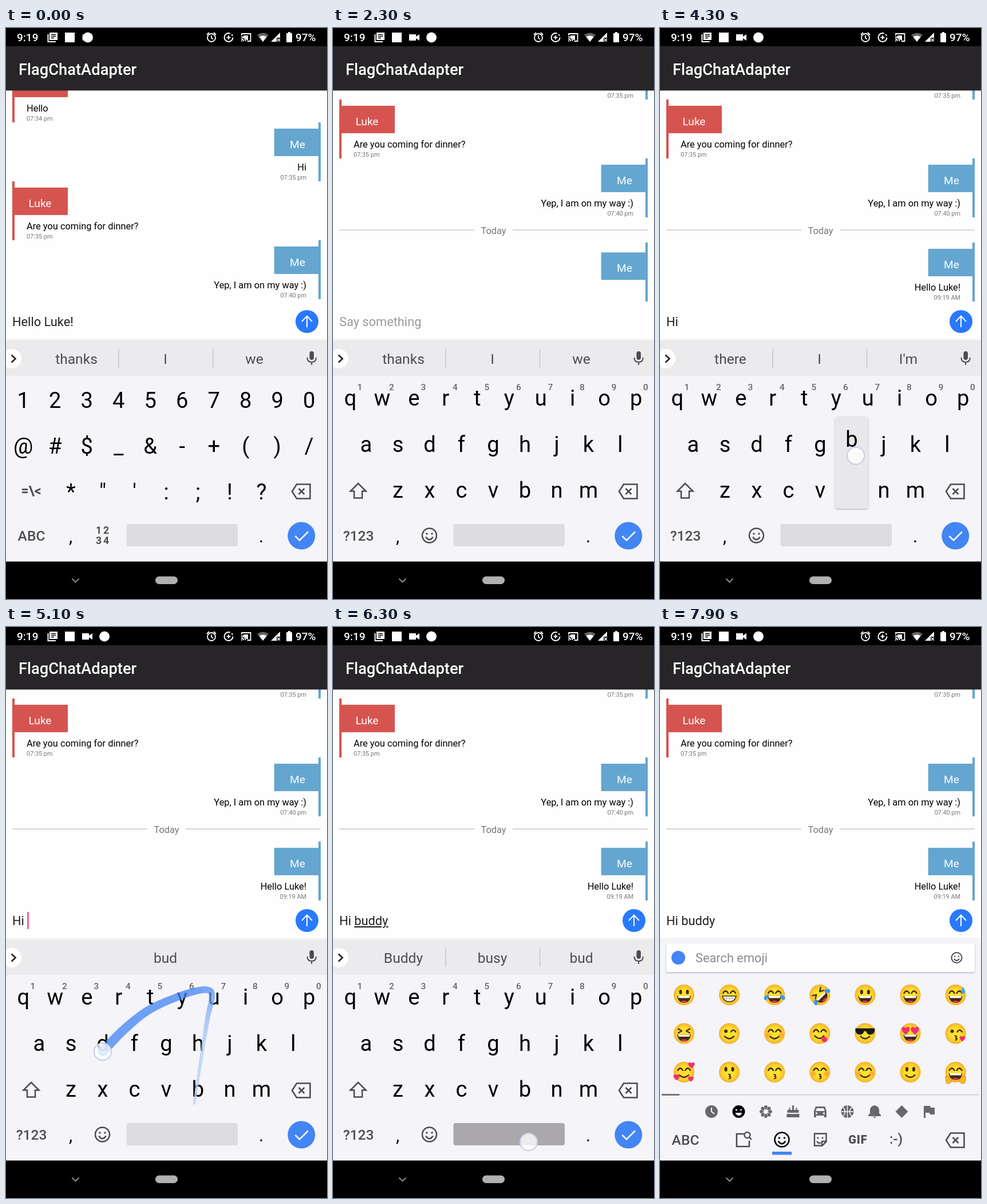
Write an HTML page that moves like this. It is 561 by 998 pixels and loops after 8 s.

```html
<!DOCTYPE html>
<html lang="en">
<head>
<meta charset="utf-8">
<title>FlagChatAdapter</title>
<style>
html, body { margin: 0; width: 100%; height: 100%; overflow: hidden; background: #000; }
svg { display: block; width: 561px; height: 998px; font-family: Roboto, "Open Sans", sans-serif; }
</style>
</head>
<body>
<svg id="stage" viewBox="0 0 561 998"></svg>
<script>
const LOOP = 8000;
const RED = '#d6544f', BLUE = '#64a6cf', KEY_BLUE = '#4285f4', GREY = '#4c4c50';

// ---------- markup helpers ----------
const attrs = o => Object.entries(o).map(([k, v]) => ` ${k}="${v}"`).join('');
const text = (x, y, s, size, o = {}) => `<text x="${x}" y="${y}" font-size="${size}"${attrs(o)}>${s}</text>`;
const mid = (x, y, s, size, o = {}) => text(x, y, s, size, { 'text-anchor': 'middle', ...o });
const rect = (x, y, w, h, fill, o = {}) => `<rect x="${x}" y="${y}" width="${w}" height="${h}" fill="${fill}"${attrs(o)}/>`;
const disc = (x, y, r, fill, o = {}) => `<circle cx="${x}" cy="${y}" r="${r}" fill="${fill}"${attrs(o)}/>`;
const shape = (d, fill, o = {}) => `<path d="${d}" fill="${fill}"${attrs(o)}/>`;
const line = (d, color, width = 2, o = {}) => shape(d, 'none', { stroke: color, 'stroke-width': width, ...o });
const group = (x, y, body, o = {}) => `<g transform="translate(${x} ${y})"${attrs(o)}>${body}</g>`;
const MEDIUM = { 'font-weight': 500 }, BOLD = { 'font-weight': 700 };
const ROUND = { 'stroke-linecap': 'round', 'stroke-linejoin': 'round' };

// ---------- status, title and navigation bars ----------
function bars() {
  const w = '#fff';
  return rect(0, 0, 561, 32.8, '#000') + rect(0, 32.8, 561, 76.4, '#272528') +
    rect(0, 109.2, 561, 1.5, '#000', { opacity: .1 }) +
    text(22, 81.5, 'FlagChatAdapter', 27.3, { fill: w, ...MEDIUM }) +
    text(19, 23, '9:19', 19, { fill: w, ...MEDIUM }) +
    text(506, 23, '97%', 19, { fill: w, ...MEDIUM }) +
    rect(76, 8, 14, 13, w) + line('M73.5 11V24H87', w, 2) +
    line('M79 11.5h8M79 14.5h8M79 17.5h5', '#000', 1.4) +
    rect(103, 8, 17, 17, w) +
    shape('M133 11h12v4l6-4v11l-6-4v4h-12z', w, { id: 'camera' }) +
    disc(0, 16.5, 9, w, { id: 'badge' }) +
    line('M366 17a7 7 0 1 1-14 0a7 7 0 1 1 14 0M359 13v4.5l3 2M351 12l4-4M367 12l-4-4', w, 1.8) +
    disc(389, 16.5, 7.5, 'none', { stroke: w, 'stroke-width': 2, 'stroke-dasharray': '38 3 3 3' }) +
    line('M389 13v7M385.5 16.5h7', w, 1.8) +
    line('M412 13V10h15.5v13h-6M411 22.5h2M411 19q4 0 4 4M411 15.5q7.5 0 7.5 7.5', w, 1.8) +
    shape('M423 13v8h-3q-1-4-5-6v-2z', w) +
    shape('M439 12q10-7 20 0l-10 12z', '#666') + shape('M442.5 15.5q6.5-4 13 0L449 24z', w) +
    shape('M479 8v16h-16z', w) + rect(473, 17, 7, 8, '#000') + line('M474 18.5l5 5M479 18.5l-5 5', w, 1.5) +
    rect(490, 9, 10, 16, w, { rx: 1 }) + rect(493, 7, 4, 3, w) +
    rect(0, 932.5, 561, 65.5, '#000') + line('M115.5 962.5l6 6 6-6', '#949494', 1.8) +
    rect(261, 958.5, 39, 13.5, '#b0b0b0', { rx: 6.7 });
}

// ---------- chat ----------
function message(top, mine, body, time, live) {
  const x = mine ? 525 : 36, o = { 'text-anchor': mine ? 'end' : 'start' };
  const color = mine ? BLUE : RED;
  const flag = rect(mine ? 468.7 : 13, 10.9, mine ? 79 : 95, 48, color) +
    mid(mine ? 509.5 : 59.5, 45, mine ? 'Me' : 'Luke', 19.1, { fill: '#fff' });
  const words = text(x, 84, body, 16.4, o) + text(x, 99.5, time, 10.9, { ...o, fill: '#777' });
  return group(0, top, rect(mine ? 546 : 10.9, 0, 4.1, 103, color) +
    `<g${live ? ' id="flag"' : ''}>${flag}</g><g${live ? ' id="words"' : ''}>${words}</g>`);
}
const chat = () => `<g clip-path="url(#listClip)"><g id="list">` +
  message(62, false, 'Hello', '07:34 pm') + message(165, true, 'Hi', '07:35 pm') +
  message(268, false, 'Are you coming for dinner?', '07:35 pm') +
  message(371, true, 'Yep, I am on my way :)', '07:40 pm') +
  line('M11 496H247M314 496H550', '#c8c8c8', 1.5) + mid(280.5, 503, 'Today', 16.4, { fill: '#777' }) +
  message(518, true, 'Hello Luke!', '09:19 AM', true) + '</g></g>';

const field = () => text(11, 521, '', 21.8, { id: 'field' }) + rect(0, 498, 2.4, 30, '#e8487f', { id: 'caret' }) +
  `<g id="send">${disc(0, 0, 20, '#2979ff')}${line('M0 10V-9M-9 0L0-9.5 9 0', '#fff', 2)}</g>`;

// ---------- keyboard ----------
const KEY = 38.2, STEP = 55.5, CENTER = 280;
const row = (y, chars) => [...chars].map((c, i) =>
  mid(CENTER + (i - (chars.length - 1) / 2) * STEP, y, c.replace('&', '&amp;'), KEY)).join('');
const backspace = line('M508 797.5h23.5v25H508l-8-12.5zM511.5 805l10 10M521.5 805l-10 10', GREY, 2.6);
const smiley = (x, y, r, color, width) => group(x, y,
  disc(0, 0, r, 'none', { stroke: color, 'stroke-width': width }) +
  disc(-r * .36, -r * .25, r * .14, color) + disc(r * .36, -r * .25, r * .14, color) +
  line(`M${-r * .5} ${r * .2}Q0 ${r * .95} ${r * .5} ${r * .2}`, color, width));

function keyboard() {
  const small = { fill: GREY, ...MEDIUM }, pad = { fill: GREY, ...BOLD, 'letter-spacing': 3 };
  const digits = [...'1234567890'].map((d, i) => mid(47 + i * STEP, 632.5, d, 15.5, { fill: '#66666a', ...MEDIUM })).join('');
  return `<g id="keys">` + rect(0, 546, 561, 62, '#ebeaed') +
    `<g id="hints"></g>` + disc(10, 578, 17, '#fff') + line('M9.5 571.5l7 6.5-7 6.5', '#222', 2.6) +
    rect(530.5, 565, 7.5, 15, GREY, { rx: 3.7 }) + line('M526.5 576q0 8 7.7 8t7.7-8M534.2 584v5', GREY, 2) +
    `<g id="numeric">` + row(663.5, '1234567890') + row(743.5, '@#$_&-+()/') + row(823.5, `*"':;!?`) +
      mid(44, 816.5, '=\\&lt;', 23.5, { fill: GREY, ...BOLD }) + mid(44.5, 896, 'ABC', 24.5, small) +
      mid(170, 884, '12', 17.5, pad) + mid(170, 902, '34', 17.5, pad) + '</g>' +
    `<g id="letters">` + row(660, 'qwertyuiop') + digits + row(740.5, 'asdfghjkl') + row(820.5, 'zxcvbnm') +
      line('M44 796l-13.5 13.5h6.5v12h14v-12h6.5z', GREY, 2.5) +
      mid(44.5, 896, '?123', 24.5, small) + smiley(168.5, 887, 12.5, GREY, 2.5) + '</g>' +
    backspace + mid(113, 899, ',', 31) + mid(446, 899, '.', 31) +
    rect(210.5, 867, 194.5, 39, '#dddce0', { rx: 4, id: 'space' }) +
    disc(516.3, 887.5, 24, KEY_BLUE) + line('M505.5 888l7.5 7.5 15-15', '#fff', 2.6) +
    `<g id="popup">${rect(306, 0, 58, 161, '#e8e7ea', { rx: 5, filter: 'url(#shade)' })}${mid(335, 53, '', KEY, { id: 'popupChar' })}</g>` +
    `<g id="trail"></g></g>`;
}

// ---------- emoji panel ----------
const INK = '#422b0d', PINK = '#f0326e';
const heart = (x, y, s) => group(x, y, `<g transform="scale(${s})">${shape('M0 6C-11-2-5-9 0-4 5-9 11-2 0 6Z', PINK)}</g>`);
const PARTS = {
  dot: `<g fill="${INK}"><ellipse cx="-6" cy="-5" rx="2.6" ry="3.9"/><ellipse cx="6" cy="-5" rx="2.6" ry="3.9"/></g>`,
  arc: line('M-11-3q4.5-7.5 9 0M2-3q4.5-7.5 9 0', INK, 2.4, ROUND),
  squint: line('M-10-8l6 3.5-6 3.5M10-8l-6 3.5 6 3.5', INK, 2.4, ROUND),
  wink: disc(-6, -4, 3, INK) + line('M3-3q4-6 8 0', INK, 2.4, ROUND),
  shades: shape('M-17-9H17v4q-2 7-8 7T2-4h-4q-1 6-7 6t-8-7z', '#171717'),
  loved: heart(-8, -5, 1.15) + heart(8, -5, 1.15),
  open: shape('M-12 2H12Q10 14 0 14T-12 2Z', INK) + shape('M-10.5 2H10.5L9.5 5.5H-9.5Z', '#fff') + shape('M-6 12q6-4 12 0-6 3-12 0z', PINK),
  grin: shape('M-12 2H12Q10 12 0 12T-12 2Z', '#fff', { stroke: INK, 'stroke-width': 1.6 }) + line('M-11 6H11M-5 2v9M0 2v10M5 2v9', '#ad9a82', .8),
  smile: line('M-8 5q8 8 16 0', INK, 2.4, ROUND),
  kiss: line('M-1 4q5 0 1 3.5q5 1 0 4', INK, 2.1, ROUND),
  tongue: line('M-9 4q9 9 16 0', INK, 2.4, ROUND) + shape('M2 7l8-2q6 8 0 10t-8-8z', PINK),
  blush: disc(-11, 3, 4, '#ff7a2c', { opacity: .4 }) + disc(11, 3, 4, '#ff7a2c', { opacity: .4 }),
  tears: shape('M-10-1q-11 3-8 9 6 4 8-9zM10-1q11 3 8 9-6 4-8-9z', '#3d9be8'),
  sweat: shape('M13-14q-7 11 0 12 7-1 0-12z', '#4aa5ea'),
  peck: heart(12, 9, .8),
  adored: heart(13, -12, .9) + heart(-13, 9, .9) + heart(12, 12, .8),
  hands: shape('M-18 8q3-3 8 2l4 5q-4 7-10 4zM18 8q-3-3-8 2l-4 5q4 7 10 4z', '#f9b928', { stroke: '#d98214', 'stroke-width': 1 }),
  tilt: ''
};
const FACES = [
  'dot open', 'arc grin', 'arc open tears', 'tilt squint open tears', 'dot open', 'arc open', 'arc open sweat',
  'squint open', 'wink smile', 'arc smile blush', 'arc tongue', 'shades smile', 'loved open', 'wink kiss peck',
  'arc smile adored', 'dot kiss', 'arc kiss', 'arc kiss blush', 'arc smile blush', 'dot smile', 'arc open hands'
];
const face = (names, i) => group(42 + i % 7 * 79.1, 643 + Math.floor(i / 7) * 67.5,
  `<g${names.startsWith('tilt') ? ' transform="rotate(-45)"' : ''}>` + disc(0, 0, 18, 'url(#skin)') +
  names.split(' ').map(n => PARTS[n]).join('') + '</g>');

function categories() {
  const c = '#68676b', bg = '#f5f4f8';
  const petals = Array.from({ length: 8 }, (_, i) => {
    const a = i * Math.PI / 4;
    return disc(8 * Math.cos(a), 8 * Math.sin(a), 2.9, c) + line(`M0 0L${8 * Math.cos(a)} ${8 * Math.sin(a)}`, c, 3);
  }).join('');
  return [
    disc(0, 0, 11, c) + line('M0-7V0l5 4', bg, 2),
    disc(0, 0, 11, '#000') + disc(-4, -3, 1.6, bg) + disc(4, -3, 1.6, bg) + shape('M-6 2H6Q4 7 0 7T-6 2Z', bg),
    petals + disc(0, 0, 4, bg),
    rect(-11, 4, 22, 6, c) + rect(-10, -3, 20, 5, c) + rect(-1.5, -7, 3, 5, c) + rect(-7, -7, 2, 4, c) + rect(5, -7, 2, 4, c) + disc(0, -9, 2, c),
    shape('M-11 10V-1l3-8H8l3 8V10H7V7H-7v3z', c) + shape('M-8-1l2-5H6l2 5z', bg) + disc(-6.5, 3, 1.7, bg) + disc(6.5, 3, 1.7, bg),
    disc(0, 0, 11, c) + line('M-11 0H11M0-11V11M-8-8q8 8 0 16M8-8q-8 8 0 16', bg, 1.4),
    shape('M-11 8v-2l3-3v-6q1-7 8-8 7 1 8 8v6l3 3v2zM-3 9h6q-3 4-6 0z', c),
    shape('M0-11L11 0 0 11-11 0z', c),
    shape('M-9-10H2l1 3h7V5H2L1 2h-7v9h-3z', c)
  ].map((icon, i) => group(90 + i * 47.5, 847, icon)).join('');
}

function emojiPanel() {
  return `<g id="emoji">` + rect(11, 553, 539, 50, '#fff', { rx: 2, filter: 'url(#shade)' }) +
    disc(32, 578, 12, KEY_BLUE) + text(62, 586, 'Search emoji', 21.8, { fill: '#8c8c90' }) + smiley(518.5, 578, 9, GREY, 2) +
    FACES.map(face).join('') + rect(3, 816, 555, 3, '#dcdbdf') + rect(3, 816, 31, 3, '#77767a') + categories() +
    mid(44.5, 905, 'ABC', 24.5, { fill: GREY, ...MEDIUM }) +
    line('M147 886h-13v22h22v-10', GREY, 2.6) + disc(152.5, 888, 5, 'none', { stroke: GREY, 'stroke-width': 2.4 }) + line('M156 892l4 4', GREY, 2.4) +
    smiley(213, 896, 12.5, '#000', 2.6) + rect(196, 917, 34, 5.5, KEY_BLUE) +
    line('M270 885.5h20.5v14l-7 7H270zM290 899h-7v7M274 899q4 5 7 2', GREY, 2.4) + disc(276, 893, 1.6, GREY) + disc(284, 893, 1.6, GREY) +
    mid(346, 903, 'GIF', 20, { fill: GREY, 'font-weight': 900, 'letter-spacing': 1 }) + mid(412.5, 903, ':-)', 24.5, { fill: GREY, ...MEDIUM }) +
    group(0, 87, backspace) + '</g>';
}

document.getElementById('stage').innerHTML = `<defs>
  <clipPath id="listClip"><rect y="109" width="561" height="372"/></clipPath>
  <radialGradient id="skin"><stop offset=".5" stop-color="#fde030"/><stop offset=".9" stop-color="#f7c02b"/><stop offset="1" stop-color="#f4a223"/></radialGradient>
  <filter id="shade" x="-20%" y="-20%" width="140%" height="140%"><feDropShadow dx="0" dy="1.5" stdDeviation="1.5" flood-opacity=".25"/></filter></defs>` +
  rect(0, 0, 561, 998, '#fefefe') + chat() + field() + rect(0, 543, 561, 3, '#000', { opacity: .03 }) +
  rect(0, 545, 561, 388, '#f5f4f8') + keyboard() + emojiPanel() + bars() +
  disc(0, 0, 15, '#fff', { id: 'touch', 'fill-opacity': .78, stroke: '#c6cee2', 'stroke-width': 2 });

// ---------- timeline: [start, value] ----------
const FIELD = [[0, 'Hello Luke!'], [1150, ''], [3650, 'Hi'],
  [5760, 'Hi <tspan text-decoration="underline">buddy</tspan>'], [6400, 'Hi buddy']];
const CARET = [[0, 0], [400, 123], [900, 0], [1120, 12], [1850, 0], [2350, 12], [2850, 0], [3650, 38], [4150, 0],
  [4650, 38.5], [5150, 0], [5760, 98], [6250, 0], [6400, 103], [6900, 0], [7400, 103], [7900, 0]];
const HINTS = [[0, 'thanks|I|we'], [3150, 'Hi'], [3750, "there|I|I'm"], [4550, 'by'], [4900, 'bud'],
  [5450, 'buddy'], [5760, 'Buddy|busy|bud'], [6420, 'I|how|are']];
const POPUP = [[0, ''], [2900, 'h'], [3060, ''], [4160, 'b'], [4360, '']];
const TAPS = [[1090, 1290, 525, 518], [6200, 6400, 342, 900], [6640, 6820, 168, 890]];
const SWIPES = [
  [[2900, 334, 738], [3050, 345, 722], [3300, 392, 675], [3500, 419, 650], [3620, 420, 648]],
  [[4160, 329, 833], [4300, 342, 748], [4450, 352, 685], [4600, 360, 645], [4680, 350, 634], [4780, 312, 642],
   [4900, 252, 668], [5000, 208, 702], [5100, 169, 742], [5250, 165, 747], [5400, 200, 718], [5550, 265, 670], [5740, 308, 645]]
];

const at = (steps, t) => steps.filter(s => s[0] <= t).pop()[1];
const ramp = (t, a, b) => Math.min(1, Math.max(0, (t - a) / (b - a)));
const smooth = p => (1 - Math.cos(Math.PI * p)) / 2;
const el = id => document.getElementById(id);
const set = (id, o) => { for (const k in o) el(id).setAttribute(k, o[k]); };
const show = (id, on) => set(id, { visibility: on ? 'visible' : 'hidden' });
const fill = (id, html) => { const e = el(id); if (e.dataset.html !== html) { e.dataset.html = html; e.innerHTML = html; } };

// Point on a swipe, by Catmull-Rom through its timed points
function along(pts, t) {
  const i = Math.max(0, pts.findLastIndex(p => p[0] <= t));
  if (i >= pts.length - 1) return pts[pts.length - 1].slice(1);
  const [a, b, c, d] = [-1, 0, 1, 2].map(k => pts[Math.min(pts.length - 1, Math.max(0, i + k))]);
  const u = ramp(t, b[0], c[0]);
  return [1, 2].map(k => b[k] + u / 2 * (c[k] - a[k] + u * (2 * a[k] - 5 * b[k] + 4 * c[k] - d[k] + u * (3 * (b[k] - c[k]) + d[k] - a[k]))));
}

// The stroke grows thinner and paler with age
function trail(t) {
  let html = '';
  for (const pts of SWIPES) {
    const start = pts[0][0], end = pts[pts.length - 1][0];
    if (t < start + 180 || t > end + 250) continue;
    const head = Math.min(t, end), tail = Math.max(start, t - 1000);
    let prev = along(pts, tail);
    for (let s = tail + 12; s < head + 12; s += 12) {
      const p = along(pts, Math.min(s, head)), k = Math.max(0, 1 - (t - s) / 1000), tint = ramp(k, .25, .65);
      const color = [[178, 66], [207, 133], [249, 244]].map(([a, b]) => Math.round(a + (b - a) * tint));
      html += line(`M${prev}L${p}`, `rgb(${color})`, (3 + 14 * k).toFixed(1), { 'stroke-linecap': 'round' });
      prev = p;
    }
    set('trail', { opacity: .75 * (1 - ramp(t, end, end + 250)) });
  }
  fill('trail', html);
}

function touch(t) {
  const tap = TAPS.find(p => t >= p[0] && t < p[1]);
  const swipe = SWIPES.find(p => t >= p[0][0] && t < p[p.length - 1][0]);
  const p = tap ? tap.slice(2) : swipe && along(swipe, t);
  show('touch', p);
  if (p) set('touch', { cx: p[0], cy: p[1] });
}

function hints(t) {
  const words = at(HINTS, t).split('|'), o = { fill: GREY };
  fill('hints', words.length === 1 ? mid(278.5, 587, words[0], 24.6, o) :
    words.map((w, i) => mid(123 + i * 155.5, 587, w, 24.6, o)).join('') + line('M197 561V594M361.5 561V594', '#c6c5c9', 1.5));
}

function draw(t) {
  const out = ramp(t, 0, 400);
  set('badge', { cx: 143 + 29 * smooth(out) });
  set('camera', { opacity: .5 + .5 * out });

  set('list', { transform: `translate(0 ${-143 * smooth(ramp(t, 1280, 1800))})` });
  set('flag', { transform: `translate(0 ${44 * (1 - smooth(ramp(t, 1850, 2450)))})` });
  set('words', { opacity: ramp(t, 2450, 2700) });

  const typed = at(FIELD, t), caret = at(CARET, t);
  fill('field', typed || 'Say something');
  set('field', { fill: typed ? '#212121' : '#9a9a9a' });
  show('caret', caret);
  set('caret', { x: caret - 1.2 });
  const size = t < 3000 ? 1 - ramp(t, 1120, 1190) : ramp(t, 3650, 3760);
  set('send', { transform: `translate(526 513) scale(${size})` });

  const emoji = t >= 6850;
  el('keys').style.display = emoji ? 'none' : '';
  el('emoji').style.display = emoji ? '' : 'none';
  el('numeric').style.display = t < 1300 ? '' : 'none';
  el('letters').style.display = t < 1300 ? 'none' : '';
  set('space', { fill: t >= 6200 && t < 6400 ? '#aaa8ab' : '#dddce0' });
  const key = at(POPUP, t);
  el('popup').style.display = key ? '' : 'none';
  set('popup', { transform: `translate(0 ${key === 'b' ? 679 : 599})` });
  fill('popupChar', key);
  hints(t);
  trail(t);
  touch(t);
}

const began = performance.now();
function tick() {
  draw((performance.now() - began) % LOOP);
  requestAnimationFrame(tick);
}
tick();
</script>
</body>
</html>
```
